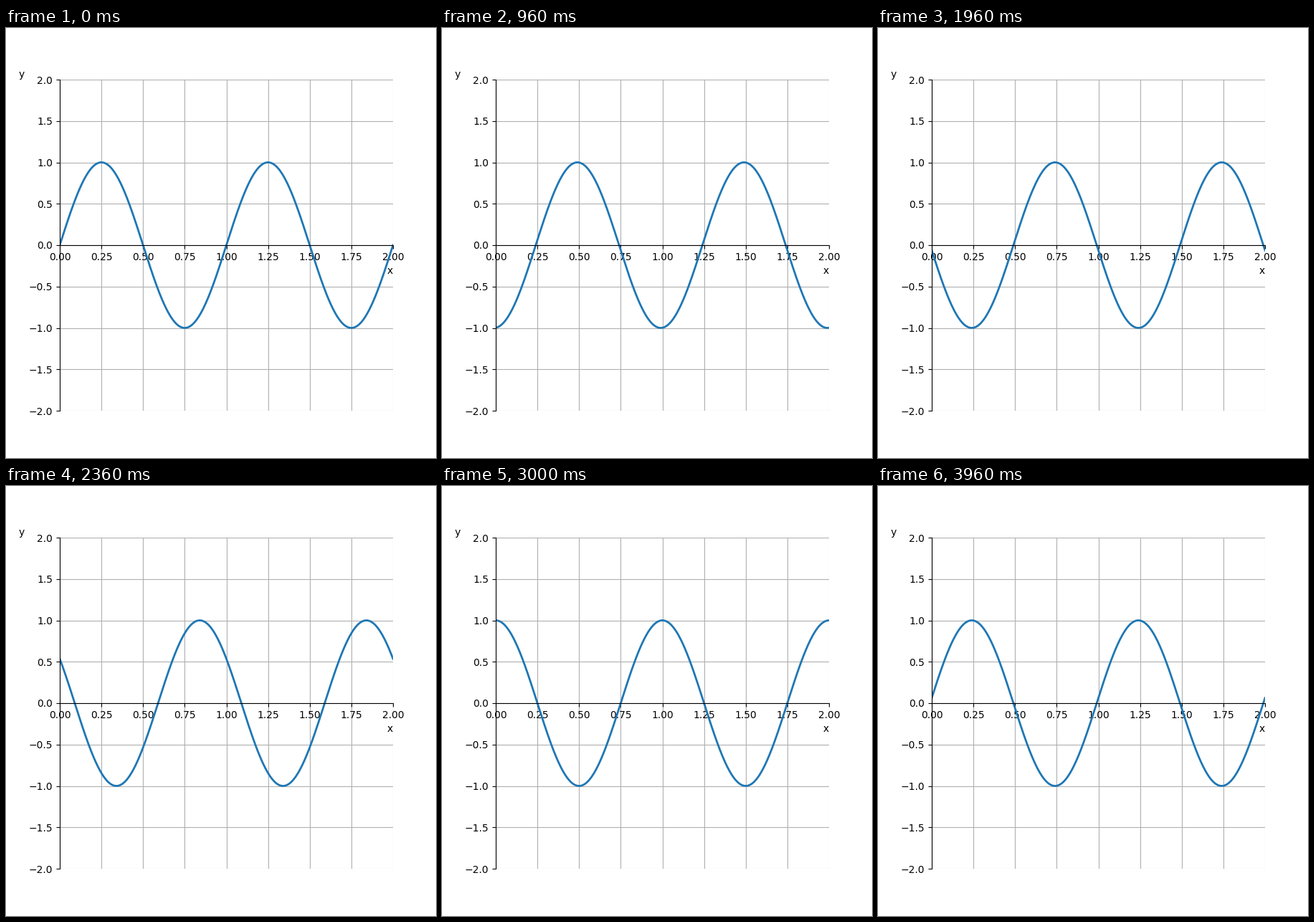
Recreate the animation shown at these times as a matplotlib script. Size 600 by 600 pixels, loop 4000 ms.

```python
import numpy as np
import matplotlib.pyplot as plt
from matplotlib.animation import FuncAnimation

FRAMES = 100
INTERVAL = 40

fig, ax = plt.subplots(figsize=(6, 6), dpi=100)
ax.set_xlim(0, 2)
ax.set_ylim(-2, 2)
ax.grid(True)
ax.spines[["top", "right"]].set_visible(False)
ax.spines["bottom"].set_position(("data", 0))
ax.set_xlabel("x", loc="right")
ax.set_ylabel("y", loc="top", rotation=0)

x = np.linspace(0, 2, 1000)
wave, = ax.plot([], [], lw=2)


def init():
    wave.set_data([], [])
    return wave,


def update(i):
    # The wave travels one full wavelength to the right per loop.
    wave.set_data(x, np.sin(2 * np.pi * (x - i / FRAMES)))
    return wave,


anim = FuncAnimation(fig, update, frames=FRAMES, init_func=init,
                     interval=INTERVAL, repeat=True, repeat_delay=0)
plt.show()
```
